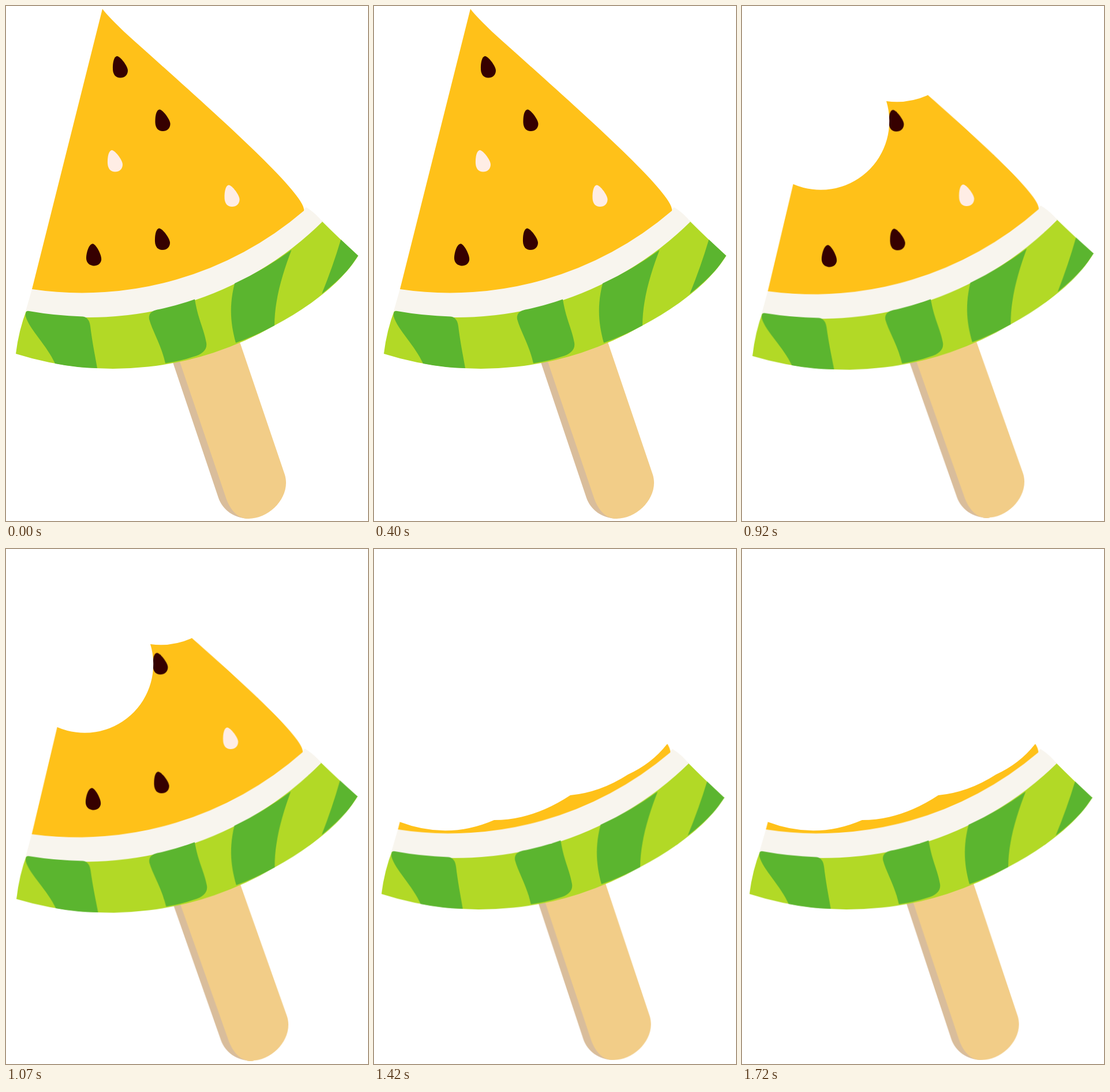
Recreate the animation shown at these times as an HTML page. Size 627x893 px, loop 1920 ms.

```html
<!DOCTYPE html>
<html lang="en">
<head>
<meta charset="utf-8">
<title>Melon popsicle</title>
<style>
  html, body { margin: 0; width: 100%; height: 100%; overflow: hidden; background: #fff; }
  svg { display: block; width: 100%; height: 100%; }

  .pop {
    transform-origin: 313.5px 518px;
    animation: tilt 1920ms step-end infinite;
  }
  .bite { fill: #fff; animation: bite 1920ms step-end infinite; }

  .flesh { fill: #ffc119; }
  .pith { fill: #f8f5ee; }
  .rind { fill: #b2d926; }
  .stripes { fill: #5bb52f; }
  .stick { fill: #f2cd88; }
  .shade { fill: #d9bd9b; }
  .dark { fill: #360000; }
  .pale { fill: #ffede5; }

  @keyframes tilt {
    0%, 100% { transform: none; }
    34.896% { transform: translate(-.7px, -5.5px) rotate(2.5deg); }
    47.917% { transform: rotate(-.76deg); }
    60.938% { transform: translate(.3px, -3.5px) rotate(3.56deg); }
    73.958% { transform: translate(-3.7px, -3.3px) rotate(.3deg); }
  }

  /* Everything above the bitten edge is covered. */
  @keyframes bite {
    0%, 100% { d: path("M0 0Z"); }
    34.896% { d: path("M141 153Q177 127 197 90C213 108 256 115 289 97L400 0H0V153Z"); }
    47.917% { d: path("M89 309A119 119 0 0 0 250 165Q287 170 321 155L430 0H0V309Z"); }
    60.938% { d: path("M105 289Q130 300 156 301A199 199 0 0 0 511 336L627 250V0H0V289Z"); }
    73.958% { d: path("M44 473Q128 505 208 470Q275 470 340 427Q392 422 440 391Q481 372 507 339L627 250V0H0V473Z"); }
  }
</style>
</head>
<body>
<svg viewBox="0 0 627 893">
  <defs>
    <path id="seed" d="M-6-19C-1-20 13-2 13 6C13 14 7 18.5 0 18.5C-8 18.5-12.5 13-13 4C-13.5-8-11-18-6-19Z"/>
  </defs>

  <g class="pop">
    <path class="shade" d="M286 609L368 853C375 873 394 888 420 889L440 880L330 600Z"/>
    <path class="stick" d="M298 608L380 850C387 872 400 889 420 889C458 889 494 850 483 813L402 574Z"/>

    <path class="rind" d="M36 526Q22 562 17 603A560 560 0 0 0 465 554C530 520 585 475 610 433Q579 405 546 372L300 500Z"/>
    <path class="pith" d="M45.500 489L34 529.500A575 575 0 0 0 548 374Q536 359 520 349L514 354L300 460Z"/>
    <g class="stripes">
      <path d="M40 529Q33 527 34 538C40 560 72 590 85 620Q120 627 158 628C153 600 149 580 146 555Q144 540 133 538.500Q85 537 40 529Z"/>
      <path d="M327 508.500Q295 520 262 526.500Q246 530 248 543C254 565 268 585 276 619.500Q301 616 325 608C340 604 349 596 347 584C343 560 333 545 327 508.500Z"/>
      <path d="M396 481A575 575 0 0 0 494.500 423C480 461 465 508 465 554Q430 573 398 584C389 552 386 520 396 481Z"/>
      <path d="M580 405Q566 452 547 499Q588 467 605 440L610 433Z"/>
    </g>

    <path class="flesh" d="M167 5C175 16 190 30 205 45C330 158 522 325 516 355A590 590 0 0 1 45 491Z"/>
    <g class="dark">
      <use href="#seed" x="198" y="106"/>
      <use href="#seed" x="271.500" y="198.500"/>
      <use href="#seed" x="271" y="404.500"/>
      <use href="#seed" transform="translate(153 432) rotate(10) scale(1.03 1)"/>
    </g>
    <g class="pale">
      <use href="#seed" x="189" y="269"/>
      <use href="#seed" x="391.500" y="329.500"/>
    </g>
  </g>

  <path class="bite" d="M0 0Z"/>
</svg>
</body>
</html>
```
